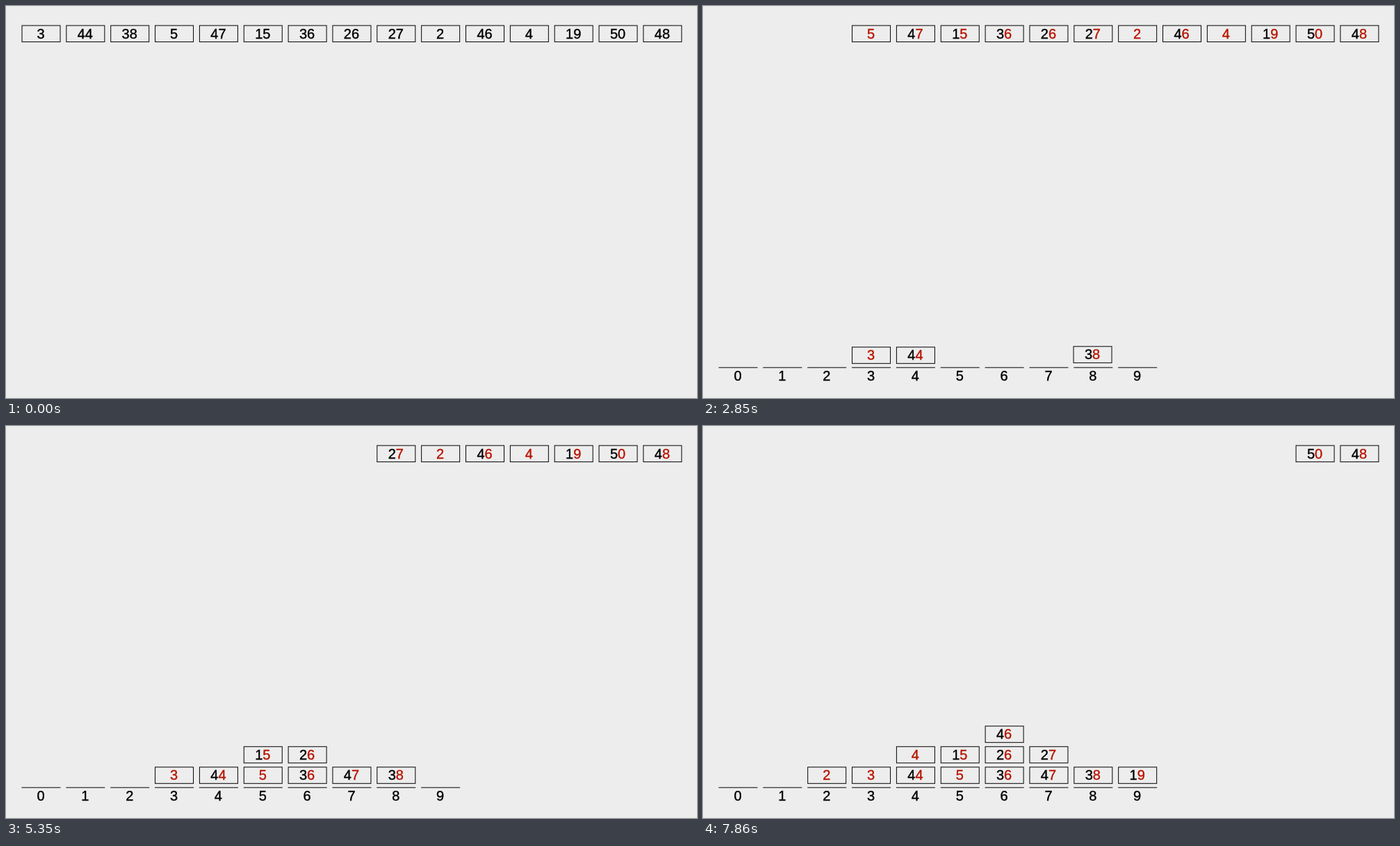
An HTML page with a canvas that plays this animation: 994 by 564 pixels, repeating every 8000 ms.

```html
<!DOCTYPE html>
<html lang="en">
<head>
<meta charset="utf-8">
<title>Radix sort: first pass</title>
<style>
  html, body { margin: 0; width: 100%; height: 100%; overflow: hidden; background: #ededed; }
  canvas { display: block; }
</style>
</head>
<body>
<canvas width="994" height="564"></canvas>
<script>
const ctx = document.querySelector('canvas').getContext('2d');
const values = [3, 44, 38, 5, 47, 15, 36, 26, 27, 2, 46, 4, 19, 50, 48];

const LOOP = 8000, BUCKETS_AT = 1200;
// Moves are sampled on a coarse clock; starts and durations are in ticks.
const CLOCK_START = 1650, TICK = 147.6;
const FIRST_MOVE = -0.381, MOVE_EVERY = 3.3396, MOVE_TICKS = 1.85;

const BOX_W = 56, BOX_H = 24.5, ROW_Y = 27.6, FLOOR_Y = 490.3, STACK_STEP = 29.5;
const INK = '#000', RED = '#b81400';

const columnX = i => 22.5 + 63.85 * i;
const mix = (a, b, p) => a + (b - a) * p;
const cubicInOut = t => t < 0.5 ? 4 * t ** 3 : 1 - 4 * (1 - t) ** 3;

// Each item goes to the bucket of its last digit, on top of earlier ones.
const heights = Array(10).fill(0);
const items = values.map((value, i) => {
  const bucket = value % 10;
  return {
    text: String(value),
    start: FIRST_MOVE + MOVE_EVERY * i,
    from: [columnX(i), ROW_Y],
    to: [columnX(bucket), FLOOR_Y - STACK_STEP * heights[bucket]++]
  };
});

// A hairline stroke gives the digits a slightly heavier weight.
function drawGlyphs(text, x, y, color) {
  ctx.fillStyle = ctx.strokeStyle = color;
  ctx.lineWidth = 0.4;
  ctx.fillText(text, x, y);
  ctx.strokeText(text, x, y);
}

function drawText(text, x, y, lastColor) {
  const head = text.slice(0, -1);
  const left = x + 27.5 - ctx.measureText(text).width / 2;
  drawGlyphs(head, left, y, INK);
  drawGlyphs(text.slice(-1), left + ctx.measureText(head).width, y, lastColor);
}

function drawItem(item, tick, lastColor) {
  const t = Math.min(1, Math.max(0, (tick - item.start) / MOVE_TICKS));
  const p = cubicInOut(t);
  const x = mix(item.from[0], item.to[0], p);
  const y = mix(item.from[1], item.to[1], p);
  ctx.strokeStyle = INK;
  ctx.lineWidth = 1;
  ctx.strokeRect(x + 0.5, y + 0.5, BOX_W - 1, BOX_H - 1);
  drawText(item.text, x, y + 19, lastColor);
}

function drawBuckets() {
  for (let digit = 0; digit < 10; digit++) {
    const x = columnX(digit);
    ctx.fillStyle = INK;
    ctx.fillRect(x, FLOOR_Y + 29.4, BOX_W, 1);
    drawText(String(digit), x, 538.8, INK);
  }
}

function draw(time) {
  const tick = Math.floor((time - CLOCK_START) / TICK);
  const sorting = time >= BUCKETS_AT;
  ctx.fillStyle = '#ededed';
  ctx.fillRect(0, 0, 994, 564);
  ctx.font = '20px "Liberation Sans", Arial, sans-serif';
  if (sorting) drawBuckets();
  for (const item of items) drawItem(item, tick, sorting ? RED : INK);
}

const origin = performance.now();
function frame() {
  draw((performance.now() - origin) % LOOP);
  requestAnimationFrame(frame);
}
frame();
</script>
</body>
</html>
```
